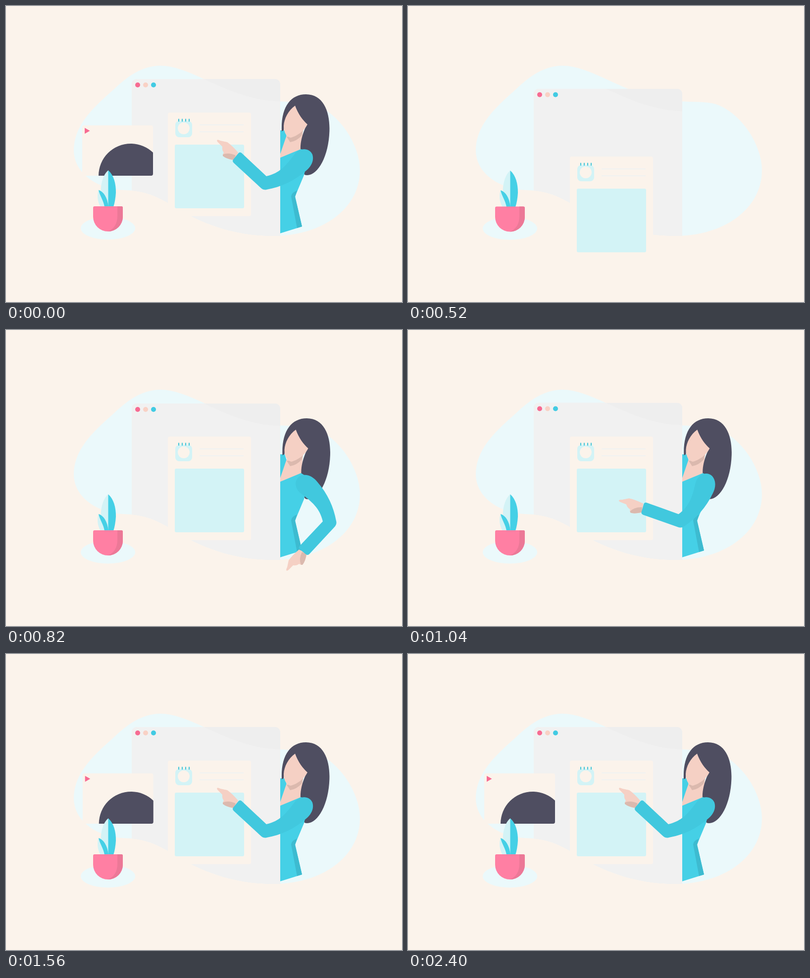
Recreate the animation shown at these times as an HTML page. Size 800 by 600 pixels, loop 2.42 s.

```html
<!DOCTYPE html>
<html lang="en">
<head>
<meta charset="utf-8">
<title>Presenting a page</title>
<style>
  html, body { margin: 0; width: 100%; height: 100%; overflow: hidden; background: #fbf3eb; }
  svg { display: block; width: 100%; height: 100%; }
  .paper { fill: #fbf3eb; }
  .mist { fill: #ebf9fb; }
  .ice { fill: #d3f3f6; }
  .teal { fill: #45d0e6; }
  .sleeve { fill: #41c8de; }
  .fold { fill: #3dbbd0; }
  .pink { fill: #f76b92; }
  .hair { fill: #4f4e61; }
  .skin { fill: #f5d0c4; }
  .tan { fill: #dbb9ae; }
</style>
</head>
<body>
<svg viewBox="0 0 800 600">
  <defs>
    <clipPath id="floor">
      <path d="M137 292V-200H715V333C715 410 640 466 540 466C455 466 390 437 345 410C310 388 285 374 235 373C185 370 137 340 137 292Z"/>
    </clipPath>
    <clipPath id="pane"><rect x="254" y="148" width="300" height="700" rx="10"/></clipPath>
    <clipPath id="desk"><rect width="800" height="525"/></clipPath>
    <clipPath id="side"><rect x="554" width="246" height="600"/></clipPath>
    <clipPath id="frame"><rect x="154" y="242" width="143" height="102" rx="4"/></clipPath>
  </defs>

  <path class="mist" d="M137 292C137 235 190 195 222 165C252 137 280 121 312 121C375 121 445 187 545 193C575 195 600 193 622 199C672 216 715 280 715 333C715 410 640 466 540 466C455 466 390 437 345 410C310 388 285 374 235 373C185 370 137 340 137 292Z"/>

  <g clip-path="url(#floor)">
    <g id="browser">
      <g clip-path="url(#pane)">
        <rect x="254" y="148" width="300" height="700" fill="#eeeeee"/>
        <path fill="#f1f1f1" d="M254 121H312C375 121 445 187 545 193L560 194V850H254Z"/>
      </g>
      <circle class="pink" cx="266" cy="160" r="5"/>
      <circle cx="282" cy="160" r="5" fill="#f9d1c5"/>
      <circle cx="298" cy="160" r="5" fill="#42cbe3"/>
    </g>
  </g>

  <g id="video">
    <g clip-path="url(#frame)">
      <rect class="paper" x="154" y="242" width="143" height="102"/>
      <circle class="hair" cx="252" cy="344" r="65"/>
    </g>
    <path class="pink" d="M159 247L169.500 253L159 259Z"/>
  </g>

  <g clip-path="url(#desk)">
    <g id="doc">
      <rect class="paper" x="327" y="216" width="168" height="210" rx="4"/>
      <rect class="ice" x="342" y="233" width="34" height="33" rx="8"/>
      <circle class="paper" cx="359" cy="248" r="12"/>
      <path d="M349 229.500v4M356 229.500v4M363 229.500v4M370 229.500v4" stroke="#40c4d8" stroke-width="2" stroke-linecap="round"/>
      <path d="M391 241H480M391 255H480" stroke="#f0f2f1" stroke-width="2"/>
      <rect class="ice" x="341" y="281" width="140" height="129" rx="3"/>
    </g>
  </g>

  <g id="woman">
    <g clip-path="url(#side)">
      <g id="body">
        <path class="teal" d="M554 252H563L567 264L554 304Z"/>
        <path class="skin" d="M567 262L600 250L597 293L553 310V303Z"/>
        <path class="tan" d="M567 265C580 266 592 260 601 250L597 263Q587 274 574 276Z"/>
        <g id="head">
          <path class="hair" d="M557 254C555 205 575 179 606 179C640 179 653.500 212 653.500 248C653.500 300 632 343 608 343C602 343 600 340 600 330L595 292C594 270 603 250 608 240C598 232 589 216 584 203C571 214 562 230 561 252Z"/>
          <path class="skin" d="M584 202C590 219 600 232 609 240C603 252 590 263 575 267C566 265 561 255 561 243C562 228 570 212 584 202Z"/>
        </g>
        <path class="teal" d="M553 308L596 290L612 300L602 343L584 386L598 447L553 461Z"/>
        <path class="fold" d="M588 374Q577 378 576 386L588 450L598 447L584 387Z"/>
      </g>
    </g>
    <g id="armBox">
      <g id="arm">
        <path class="skin" d="M426 272Q428 270 433 273L447 276Q457 283 469 297L461 313Q447 310 440 305Q437 301 440 297Q436 292 437 285L427 275Z"/>
        <path class="tan" d="M438 301Q450 296 464 303L460 312Q445 310 438 304Z"/>
        <path class="sleeve" d="M476 298L526 345C553 339 566 323 584 299C594 287 613 287 619 301C623 314 616 326 606 334C582 355 555 367 527 372Q520 374 514 368L460 318Q456 314 460 310L469 299Q472 295 476 298Z"/>
      </g>
    </g>
  </g>

  <g id="plant">
    <ellipse class="mist" cx="206" cy="450.500" rx="55" ry="23"/>
    <path class="ice" d="M207 333C196 340 190 365 192 380L198 407H207Z"/>
    <path class="teal" d="M206.500 333C218 343 222 360 222 378Q221 395 217 407H206.500Z"/>
    <path class="ice" d="M187 373C184 382 184 396 191 407H200Z"/>
    <path class="teal" d="M187 373C197 376 205 388 207 407H199C197 394 190 386 187 373Z"/>
    <path fill="#ff7fa3" d="M176 409Q176 406 179 406H233Q236 406 236 409V427A30 30 0 0 1 176 427Z"/>
    <path fill="#ec7897" d="M225 406H233Q236 406 236 409V427A30 30 0 0 1 206 457Q225 449 225 425Z"/>
  </g>
</svg>
<script>
const LOOP = 2420;
const el = id => document.getElementById(id);
const clamp = u => Math.min(1, Math.max(0, u));
const span = (t, a, b) => clamp((t - a) / (b - a));
const ease = u => (1 - Math.cos(Math.PI * u)) / 2;
const backOut = u => 1 + 1.7 * (u - 1) ** 3 + 0.7 * (u - 1) ** 2;
const move = (id, x, y) => el(id).setAttribute('transform', `translate(${x.toFixed(2)} ${y.toFixed(2)})`);
const fade = (id, o) => el(id).setAttribute('opacity', o);
const show = (id, on) => el(id).setAttribute('visibility', on ? 'visible' : 'hidden');

function draw(time) {
  // The loop opens on one beat of the finished pose.
  const t = time < 20 ? LOOP : time;

  move('plant', 0, 46 * (1 - ease(span(t, 20, 556))));
  fade('plant', span(t, 20, 160));

  // The window drops in and swings to rest.
  const s = Math.max(0, t - 300);
  move('browser', 0, -85 * Math.exp(-0.00635 * s) * Math.cos(Math.PI * s / 200));
  fade('browser', span(t, 300, 380));

  move('doc', 0, 300 * (1 - ease(span(t, 182, 718))));

  const slide = Math.min(178, 46 * Math.exp((1200 - t) / 86));
  move('video', slide, 0);
  show('video', t > 1080);

  const turn = ease(span(t, 830, 1150));
  const inX = -125 * (1 - backOut(span(t, 560, 800)));
  show('woman', t > 560);
  move('body', inX, 0);
  move('head', 1.5 * (1 - turn), 0);
  el('arm').setAttribute('transform',
    `translate(${inX.toFixed(2)} 0) rotate(${(-90 * (1 - turn)).toFixed(2)} 604.5 309.5)`);
  if (t < 830) el('armBox').setAttribute('clip-path', 'url(#side)');
  else el('armBox').removeAttribute('clip-path');
}

const start = performance.now();
function tick(now) {
  draw(Math.max(0, now - start) % LOOP);
  requestAnimationFrame(tick);
}
draw(0);
requestAnimationFrame(tick);
</script>
</body>
</html>
```
